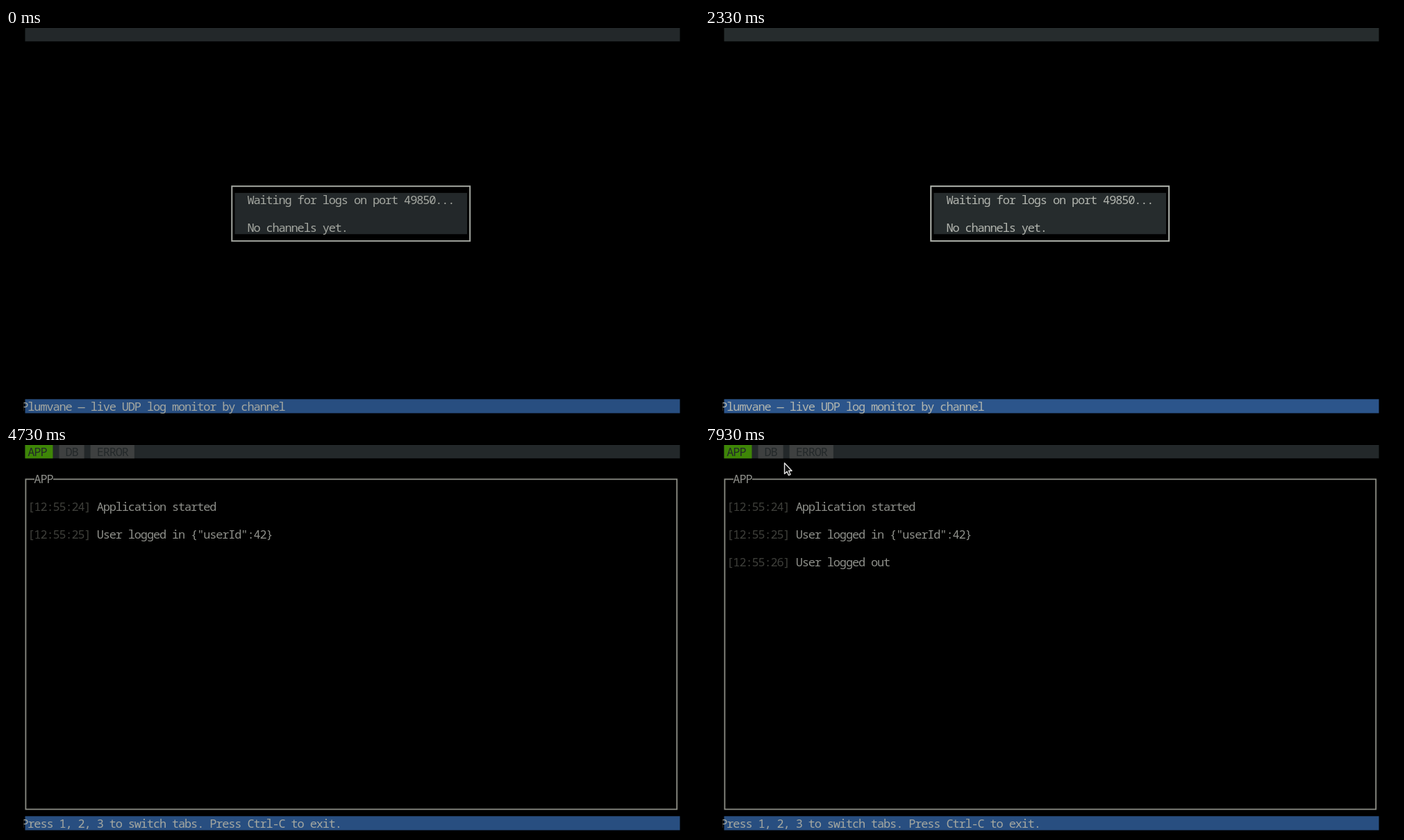
Animation of 998 by 561 pixels, one loop 8000 ms. Source, as an HTML page:

```html
<!DOCTYPE html>
<html lang="en">
<head>
<meta charset="utf-8">
<title>Log monitor</title>
<style>
  html, body { margin: 0; width: 100%; height: 100%; overflow: hidden; background: #000; }
  svg { display: block; width: 100%; height: 100%; }
  text {
    font: 17px "Noto Sans Mono", "DejaVu Sans Mono", monospace;
    letter-spacing: -1.17px;
    white-space: pre;
  }
</style>
</head>
<body>
<svg viewBox="0 0 998 561">
  <defs><clipPath id="edge"><rect x="25.5" width="945.5" height="561"/></clipPath></defs>
  <rect width="998" height="561" fill="#000"/>
  <g id="screen" clip-path="url(#edge)">
    <rect x="27.5" width="943" height="19.3" fill="#2e3436"/>
    <rect x="27.5" y="535.3" width="943" height="20.2" fill="#3465a4"/>
    <g id="waiting"></g>
    <g id="tabs"></g>
  </g>
  <path id="cursor" d="M0 0V15.5L3.6 12.2L6 17.7L8.5 16.6L6.2 11.2H10.6Z"
        fill="#111" stroke="#e4e4e4" stroke-width="1.4" stroke-linejoin="round"/>
</svg>
<script>
const NS = "http://www.w3.org/2000/svg";
const LOOP = 8000, OPEN = 2930, DIM = 0.78;
const COL = 9.03, ROW = 19.85, LEFT = 22.3;
const INK = "#d3d7cf", DARK = "#2e3436", SOFT = "#b6b8b1", FAINT = "#50514b";
const $ = id => document.getElementById(id);

function add(parent, tag, attrs, content = "") {
  const el = document.createElementNS(NS, tag);
  for (const key in attrs) el.setAttribute(key, attrs[key]);
  el.textContent = content;
  return parent.appendChild(el);
}

// Text placed on the terminal's character grid.
function write(parent, col, row, content, fill) {
  return add(parent, "text", { x: LEFT + col * COL, y: 15.7 + row * ROW, fill }, content);
}

const waiting = $("waiting"), tabs = $("tabs");

add(waiting, "rect", { x: 325.3, y: 228.2, width: 342.9, height: 79, fill: "none", stroke: INK, "stroke-width": 2 });
add(waiting, "rect", { x: 329.5, y: 237.8, width: 334.5, height: 59.5, fill: DARK });
write(waiting, 36, 12, "Waiting for logs on port 49850...", INK);
write(waiting, 36, 14, "No channels yet.", INK);
write(waiting, 0, 27, "Plumvane — live UDP log monitor by channel", INK);

[["APP", 0, "#50ac0a"], ["DB", 6, "#505352"], ["ERROR", 11, "#505352"]].forEach(([name, col, fill]) => {
  const x = Math.max(27.5, LEFT + col * COL);
  const end = LEFT + (col + name.length + 2) * COL;
  add(tabs, "rect", { x, y: 0, width: end - x, height: 19.3, fill });
  write(tabs, col + 1, 0, name, DARK);
});
add(tabs, "path", { d: "M41 49.3H28.4V525.4H966.2V49.3H68", fill: "none", stroke: "#b4b5ab", "stroke-width": 1.8 });
write(tabs, 2, 2, "APP", SOFT);
write(tabs, 0, 27, "Press 1, 2, 3 to switch tabs. Press Ctrl-C to exit.", INK);

const logs = [
  [OPEN, "[12:55:24]", "Application started"],
  [4400, "[12:55:25]", 'User logged in {"userId":42}'],
  [5930, "[12:55:26]", "User logged out"]
].map(([start, stamp, message], i) => {
  const line = add(tabs, "g", {});
  write(line, 1, 4 + i * 2, stamp, FAINT);
  write(line, 12, 4 + i * 2, message, SOFT);
  return { start, line };
});

const clamp = v => Math.max(0, Math.min(1, v));
const ease = v => v * v * (3 - 2 * v);

function draw(t) {
  const open = t >= OPEN;
  const glow = open ? 0 : Math.sin(Math.PI * clamp(t / 2870)) ** 2;
  $("screen").setAttribute("opacity", DIM + (1 - DIM) * glow);
  waiting.setAttribute("display", open ? "none" : "inline");
  tabs.setAttribute("display", open ? "inline" : "none");

  for (const { start, line } of logs) {
    line.setAttribute("opacity", t < start ? 0 : 0.6 + 0.4 * clamp((t - start) / 200));
  }

  const p = ease(clamp((t - 7200) / 730));
  $("cursor").setAttribute("display", t >= 7200 ? "inline" : "none");
  $("cursor").setAttribute("transform", `translate(${430 - 315.5 * p} ${330 - 304 * p})`);
}

const begin = performance.now();
function tick() {
  draw((performance.now() - begin) % LOOP);
  requestAnimationFrame(tick);
}
tick();
</script>
</body>
</html>
```
